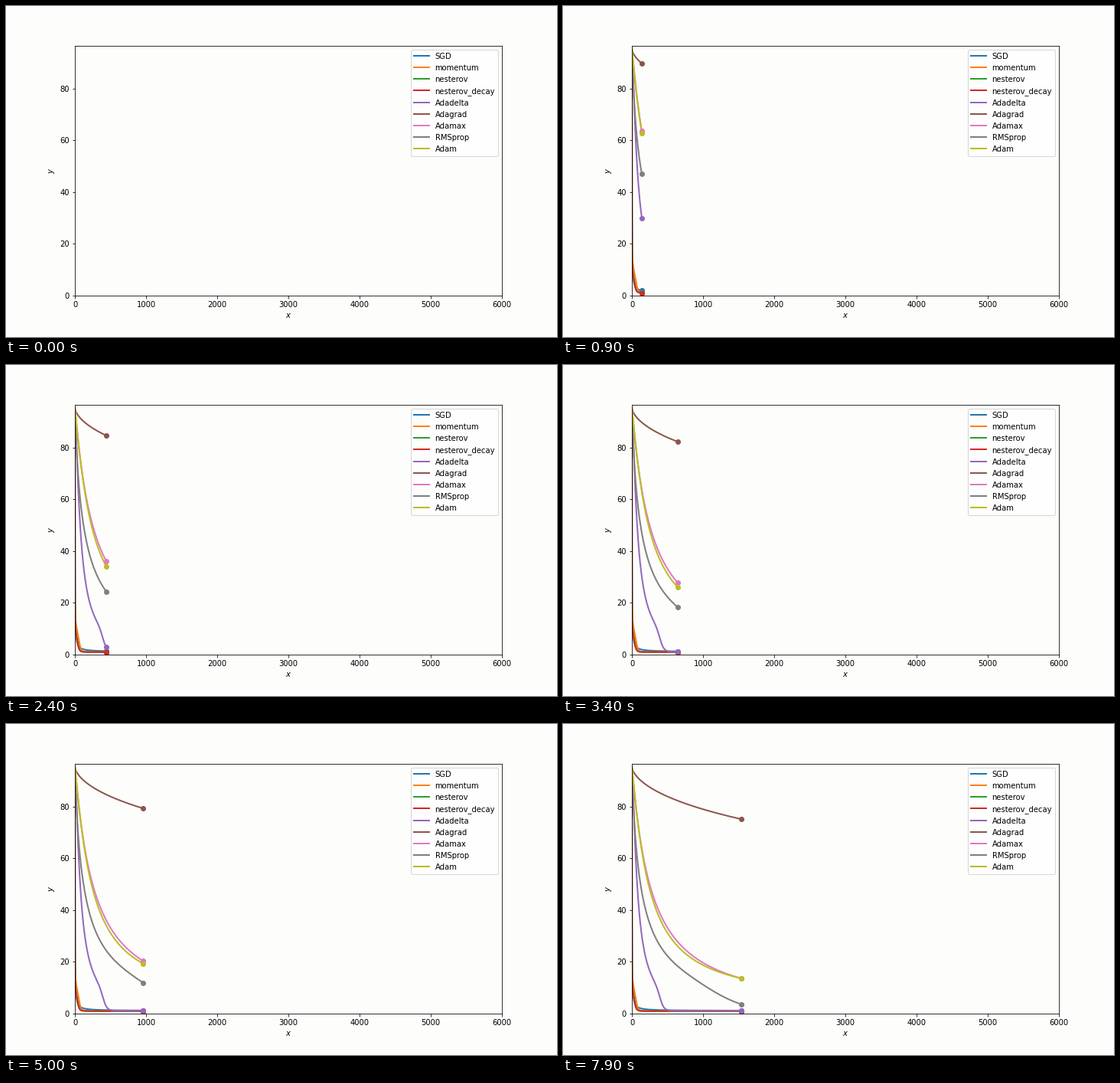
Recreate the animation shown at these times as a matplotlib script. Size 720 by 432 pixels, loop 8 s.

```python
import matplotlib.pyplot as plt
import numpy as np
from matplotlib.animation import FuncAnimation

FRAMES = 80
STEP = 20      # iterations drawn per frame
DELAY = 2      # frames before the paths start
START = 95.5   # common starting value
PAPER = "#fdfdfc"

plt.rcParams.update({"font.family": "DejaVu Sans", "font.size": 10})


def decay(x, half, power, floor=0, knee=np.inf, sharp=1):
    """Power-law fall from START to floor, with an optional late drop at knee."""
    fall = (START - floor) / (1 + (x / half) ** power)
    return floor + fall / (1 + (x / knee) ** sharp)


x = np.arange(STEP * FRAMES, dtype=float)
paths = {
    "SGD": decay(x, 1.25, 1, 1.1),
    "momentum": decay(x, 0.1, 0.4, 1, 65, 5),
    "nesterov": decay(x, 0.04, 0.4, 1, 48, 4),
    "nesterov_decay": decay(x, 0.03, 0.4, 1, 46, 4),
    "Adadelta": decay(x, 78, 1.4, 1.1, 403, 14),
    "Adagrad": decay(x, 13600, 0.6),
    "Adamax": decay(x, 273, 1.04),
    "RMSprop": decay(x, 135, 0.9, 0, 1385, 4.8),
    "Adam": decay(x, 235, 1.14, 4),
}

fig, ax = plt.subplots(figsize=(10, 6), dpi=72, facecolor=PAPER)
fig.subplots_adjust(left=0.125, right=0.9, bottom=0.125, top=0.88)
ax.set_facecolor(PAPER)
ax.set(xlim=(0, 6000), ylim=(0, 96.6), xlabel="$x$", ylabel="$y$")

lines = [ax.plot([], [], lw=2, label=name)[0] for name in paths]
dots = [ax.plot([], [], "o", color=line.get_color())[0] for line in lines]
ax.legend(loc="upper right")


def update(frame):
    end = max(0, STEP * (frame - DELAY) + 1) if frame > DELAY else 0
    head = slice(max(end - 1, 0), end)
    for line, dot, y in zip(lines, dots, paths.values()):
        line.set_data(x[:end], y[:end])
        dot.set_data(x[head], y[head])
    return lines + dots


anim = FuncAnimation(fig, update, frames=FRAMES, init_func=lambda: update(0),
                     interval=100, repeat=True, repeat_delay=0, blit=False)
plt.show()
```
